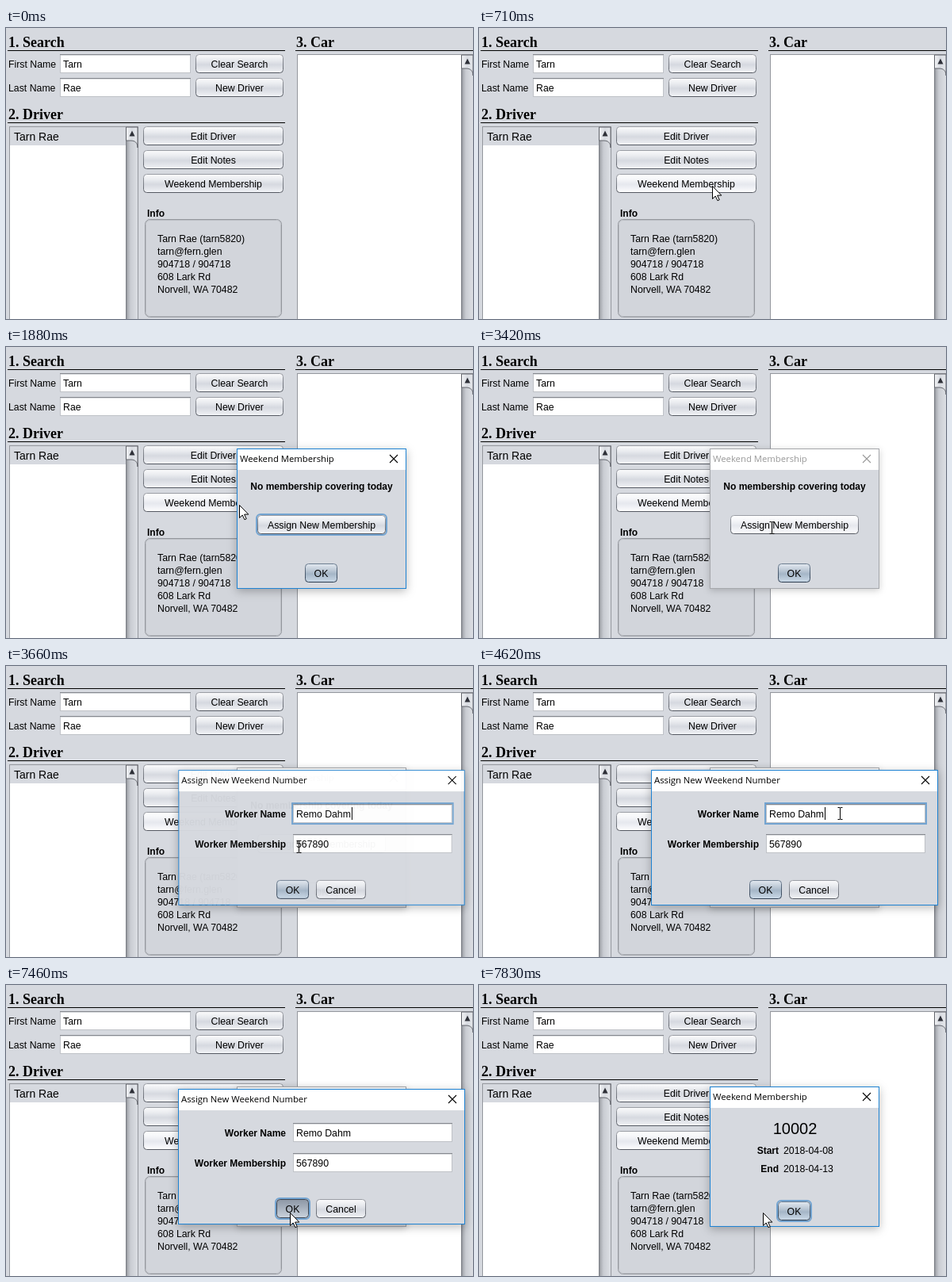
Write an HTML page that moves like this. It is 589 px wide and 367 px high and loops after 8 s.

```html
<!DOCTYPE html>
<html lang="en">
<head>
<meta charset="utf-8">
<title>Weekend membership</title>
<style>
html, body { margin: 0; width: 100%; height: 100%; overflow: hidden; background: #d6d9df; }
svg { display: block; }
text { font: 12.3px "Liberation Sans", Arial, sans-serif; }
.b { font-size: 12px; font-weight: bold; }
.h { font: bold 18px "Liberation Serif", "Times New Roman", serif; }
.row { font-size: 14px; }
.big { font-size: 20px; }
.title { font: 11.3px "Open Sans", "Noto Sans", sans-serif; }
.mid { text-anchor: middle; }
.end { text-anchor: end; }
.face { fill: url(#up); stroke: url(#edge); }
.main .face { fill: url(#blue); stroke: url(#blueEdge); }
.hover .face { fill: url(#lit); }
.main.hover .face { fill: url(#blueLit); }
.down .face, .main.down .face { fill: url(#press); stroke: #3c4552; }
.ring { fill: none; stroke: #73a4d1; stroke-width: 2; visibility: hidden; }
.focus > .ring { visibility: visible; }
.dlg { filter: drop-shadow(0 3px 6px rgba(0, 0, 0, .27)); }
.frame { fill: #d6d9df; stroke: #1f83d3; }
.cross { stroke: #000; stroke-width: 1.1; }
.off { filter: drop-shadow(0 2px 4px rgba(0, 0, 0, .2)); }
.off .frame { stroke: #a6a8ac; }
.off .title { fill: #999; }
.off .cross { stroke: #999; }
</style>
</head>
<body>
<script>
const LOOP = 8000;

const gradient = (id, stops, flat) =>
  `<linearGradient id="${id}" x2="${flat ? 1 : 0}" y2="${flat ? 0 : 1}">` +
  stops.map(([at, color]) => `<stop offset="${at}" stop-color="${color}"/>`).join('') +
  '</linearGradient>';

const text = (x, y, str, cls = '') => `<text x="${x}" y="${y}" class="${cls}">${str}</text>`;

const box = (x, y, w, h, attrs) =>
  `<rect x="${x}" y="${y}" width="${w}" height="${h}" ${attrs}/>`;

const heading = (x, y, w, str) => text(x, y, str, 'h') + box(x - 1, y + 4, w, 1, '');

const button = (id, x, y, w, label, cls = '') => `<g id="${id}" class="${cls}">
  ${box(x - 1, y - 1, w + 2, 26, 'rx="5" class="ring"')}
  ${box(x + .5, y + .5, w - 1, 23, 'rx="4" class="face"')}
  ${text(x + w / 2, y + 17, label, 'mid')}</g>`;

const field = (id, x, y, w, value, cls = '') => `<g id="${id}" class="${cls}">
  ${box(x - 1, y - 1, w + 2, 26, 'class="ring"')}
  ${box(x + .5, y + .5, w - 1, 23, 'fill="#fff" stroke="#bfc2c7"')}
  ${box(x, y, w, 1, 'fill="#85888e"')}${box(x + 1, y + 1, w - 2, 1, 'fill="#dcdee1"')}
  ${text(x + 4, y + 17, value)}</g>`;

const list = (x, y, w) => {
  const bar = x + w - 16;
  return box(x + .5, y + .5, w - 1, 400, 'fill="#fff" stroke="#94979d"') +
    box(bar, y + 1, 15, 400, 'fill="url(#track)"') +
    `<path d="M${bar + .5} ${y + 1}h14.5v26c0-6-3-9-9-9h-5.5z" fill="url(#cap)" stroke="#62656c"/>
     <path d="M${bar + 4.5} ${y + 12.5}h7l-3.5-7z" fill="#2e3038"/>`;
};

const dialog = (id, x, y, w, h, title, body) => `<g id="${id}" class="dlg">
  ${box(x + .5, y + .5, w - 1, h - 1, 'class="frame"')}
  ${box(x + 1, y + 1, w - 2, 26, 'fill="#fff"')}
  ${text(x + 4, y + 17, title, 'title')}
  <path class="cross" d="M${x + w - 21} ${y + 8}l10 10m0-10l-10 10"/>${body}</g>`;

const info = ['Tarn Rae (tarn5820)', 'tarn@fern.glen', '904718 / 904718',
  '608 Lark Rd', 'Norvell, WA 70482'];

document.body.innerHTML = `<svg width="589" height="367"><defs>
${gradient('up', [[0, '#fbfbfc'], [.3, '#e9ebef'], [.55, '#d6d9e0'], [.8, '#e4e6eb'], [1, '#f4f6f9']])}
${gradient('lit', [[0, '#fff'], [.3, '#f4f5f8'], [.55, '#e6e8ee'], [.8, '#f2f3f7'], [1, '#fff']])}
${gradient('press', [[0, '#8d97a5'], [.4, '#a3adba'], [1, '#cbd3dd']])}
${gradient('blue', [[0, '#e3e9f0'], [.35, '#bdc9d6'], [.55, '#a5b6c7'], [1, '#cbdae8']])}
${gradient('blueLit', [[0, '#f1f4f8'], [.35, '#ced8e2'], [.55, '#b8c7d6'], [1, '#dce8f3']])}
${gradient('edge', [[0, '#9a9da4'], [.6, '#777b83'], [1, '#555962']])}
${gradient('blueEdge', [[0, '#6d7e91'], [1, '#2d3d50']])}
${gradient('track', [[0, '#73767d'], [.15, '#a9acb2'], [.4, '#c9ccd2'], [1, '#dcdfe4']], true)}
${gradient('cap', [[0, '#f1f2f4'], [.5, '#d8dbe1'], [1, '#e6e8ec']], true)}
</defs>
${box(0, 0, 589, 367, 'fill="#d6d9df"')}
${heading(3, 24, 350, '1. Search')}
${text(3, 50, 'First Name')}${field('first', 68, 33, 165, 'Tarn')}
${text(3, 80, 'Last Name')}${field('last', 68, 63, 165, 'Rae')}
${button('clear', 239, 33, 111, 'Clear Search')}
${button('add', 239, 63, 111, 'New Driver')}
${heading(3, 115, 350, '2. Driver')}
${list(4, 124, 163)}
${box(5, 125, 146, 23, 'fill="#d6d9df"')}${text(10, 142, 'Tarn Rae', 'row')}
${button('edit', 173, 124, 177, 'Edit Driver')}
${button('notes', 173, 154, 177, 'Edit Notes')}
${button('weekend', 173, 184, 177, 'Weekend Membership')}
${text(178, 238, 'Info', 'b')}
${box(175.5, 241.5, 172, 123, 'rx="6" fill="#d2d5db" stroke="#94979d"')}
${box(176.5, 242.5, 170, 121, 'rx="5" fill="none" stroke="#bdc0c6"')}
${info.map((line, i) => text(191, 270 + 16 * i, line)).join('')}
${heading(366, 24, 230, '3. Car')}
${list(367, 33, 223)}
${dialog('member', 291, 128, 214, 177, 'Weekend Membership', `
  <g id="ask">${text(398, 180, 'No membership covering today', 'b mid')}
  ${button('assign', 317, 212, 162, 'Assign New Membership')}</g>
  <g id="card">${text(398.5, 188, '10002', 'big mid')}
  ${text(378, 213, 'Start', 'b end')}${text(384, 213, '2018-04-08')}
  ${text(378, 236, 'End', 'b end')}${text(384, 236, '2018-04-13')}</g>
  ${button('close', 377, 273, 41, 'OK', 'main')}`)}
${dialog('entry', 217, 131, 362, 171, 'Assign New Weekend Number', `
  ${text(353, 191, 'Worker Name', 'b end')}${field('worker', 362, 174, 201, 'Remo Dahm')}
  ${text(353, 229, 'Worker Membership', 'b end')}${field('number', 362, 212, 201, '567890')}
  <g id="caret">${box(436, 178, 1, 16, '')}</g>
  ${button('ok', 341, 270, 41, 'OK', 'main')}
  ${button('cancel', 391, 270, 63, 'Cancel')}`)}
<g id="pointer">
  <path id="arrow" d="M.5.5v16l3.7-3.5 2.7 5.7 2.3-1-2.6-5.6h5.2z" fill="#fff" stroke="#000"/>
  <path id="beam" d="M-3-7.5h2.5l.5.5.5-.5h2.5M-3 7.5h2.5l.5-.5.5.5h2.5M0-7v14" fill="none" stroke="#000"/>
</g></svg>`;

const el = id => document.getElementById(id);
const flag = (id, name, on) => el(id).classList.toggle(name, on);
const show = (id, on) => { el(id).style.display = on ? '' : 'none'; };

// Number of screen updates done out of n, spread evenly from start to end.
const ticks = (t, start, end, n) => t < start ? 0 :
  Math.min(n, Math.floor((t - start) / (end - start) * (n - 1) + .01) + 1);
const easeOut = (k, power) => 1 - (1 - k) ** power;

// start, end, updates, target x, target y, easing power
const moves = [
  [230, 710, 7, 294, 199, 1.5],
  [2570, 2950, 6, 369, 228, 1.5],
  [4360, 4790, 6, 462, 182, 2.3],
  [5270, 5580, 5, 432, 222, 1.5],
  [6130, 6600, 7, 358, 287, 1.5],
];

function pointerAt(t) {
  let x = 655, y = 325;
  for (const [start, end, n, toX, toY, power] of moves) {
    const p = easeOut(ticks(t, start, end, n) / n, power);
    x += (toX - x) * p;
    y += (toY - y) * p;
  }
  return [Math.round(x), Math.round(y)];
}

const opening = (t, start, end) => easeOut(Math.max(0, ticks(t, start, end, 5) - 1) / 4, 2.4);

function pose(id, p, cx, cy) {
  const s = .945 + .055 * p;
  show(id, p > 0);
  el(id).style.opacity = p;
  el(id).setAttribute('transform', `translate(${cx * (1 - s)} ${cy * (1 - s)}) scale(${s})`);
}

function draw(t) {
  const [x, y] = pointerAt(t);
  const over = (left, top, w) => x >= left && x < left + w && y >= top && y < top + 24;
  const between = (a, b) => t >= a && t < b;
  const asking = between(3420, 7600), done = t >= 7600;

  flag('weekend', 'hover', t >= 1560 || over(173, 184, 177));
  flag('weekend', 'down', between(1410, 1560));
  flag('weekend', 'focus', between(1410, 1560));

  pose('member', opening(t, 1560, 1880), 398, 216.5);
  flag('member', 'off', asking);
  show('ask', !done);
  show('card', done);
  flag('assign', 'hover', over(317, 212, 162));
  flag('assign', 'down', between(3270, 3420));
  flag('assign', 'focus', t < 3420);
  flag('close', 'focus', done);

  const leaving = (1 - ticks(t, 7600, 7830, 4) / 4) ** 1.6;
  pose('entry', opening(t, 3420, 3730) * leaving, 398, 216.5);
  flag('entry', 'off', done);
  flag('worker', 'focus', t < 7460);
  show('caret', t < 7460 && Math.floor((t - 3450) / 500) % 2 === 0);
  flag('ok', 'hover', over(341, 270, 41));
  flag('ok', 'down', between(7460, 7600));
  flag('ok', 'focus', t >= 7460);

  const typing = asking && (over(362, 174, 201) || over(362, 212, 201));
  show('beam', typing);
  show('arrow', !typing);
  el('pointer').setAttribute('transform', `translate(${x + (typing ? .5 : 0)} ${y})`);
}

function loop() {
  draw(performance.now() % LOOP);
  requestAnimationFrame(loop);
}
loop();
</script>
</body>
</html>
```
